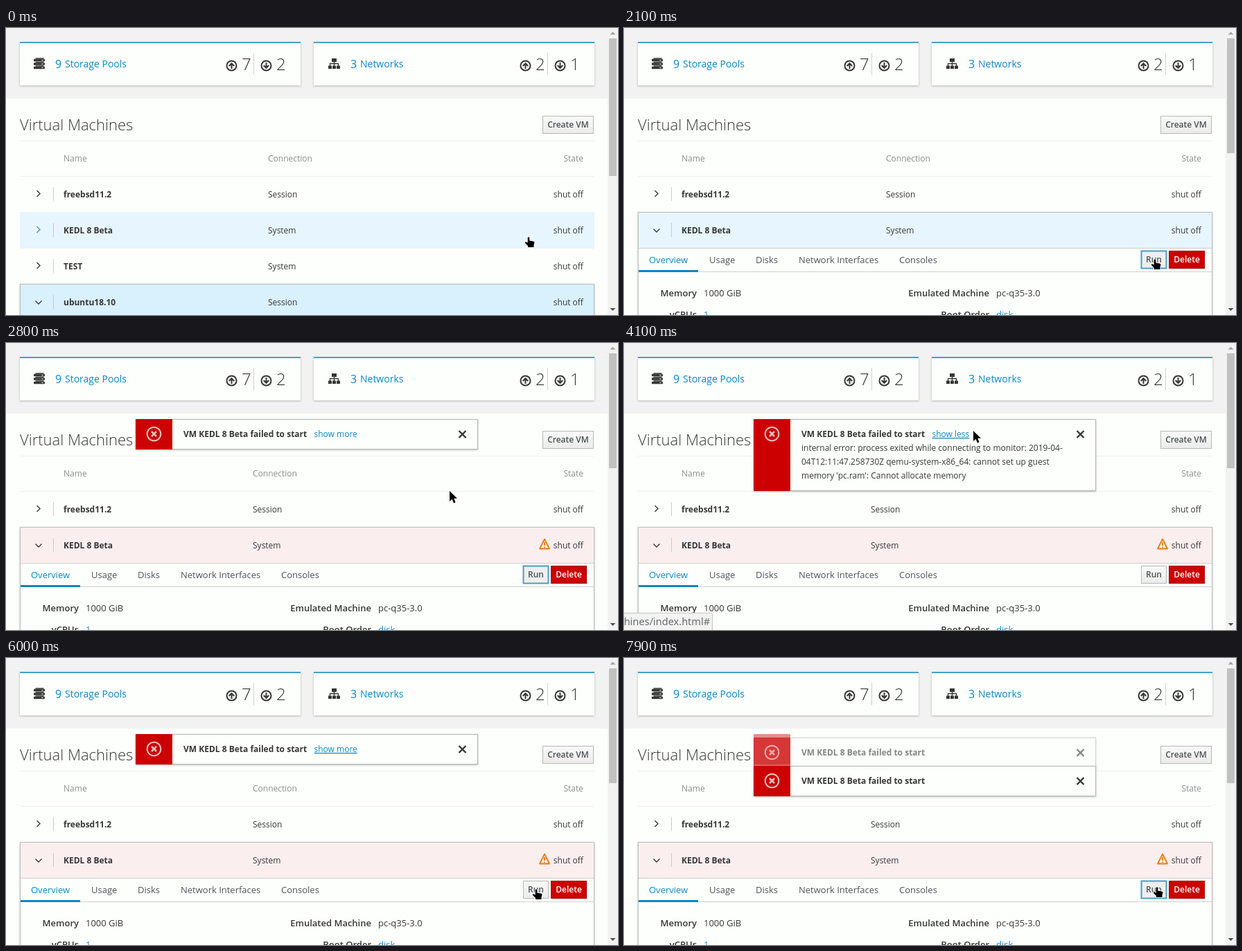
An HTML page for the animation above (8 s loop, 883 by 415 pixels).

```html
<!DOCTYPE html>
<html lang="en">
<head>
<meta charset="utf-8">
<title>Virtual Machines</title>
<style>
  html, body { margin: 0; width: 100%; height: 100%; overflow: hidden; background: #fdfffc; }
  svg { display: block; font-family: "Open Sans", sans-serif; font-size: 12px; fill: #363636; }
</style>
</head>
<body>
<svg id="stage" width="883" height="415" viewBox="0 0 883 415"></svg>
<script>
const LOOP = 8000, STEP = 100;
const VM = 'KEDL 8 Beta';
const WHITE = '#fdfffc', INK = '#363636', BLUE = '#0b86c4', RED = '#cc0000', MUTED = '#8b8d8f';
const ERROR_LINES = [
  'internal error: process exited while connecting to monitor: 2019-04-',
  '04T12:11:47.258730Z qemu-system-x86_64: cannot set up guest',
  "memory 'pc.ram': Cannot allocate memory"
];

// Times of the interactions
const EXPAND = 1000, RUN = 2100, FAIL = 2500, SHOW_MORE = 3900, SHOW_LESS = 5300,
      BLUR = 6200, RERUN = 6400, FAIL_AGAIN = 6600, DISMISS = 7500;

// Pointer tip: time, x, y
const PATH = [
  [1300, 754, 302], [1800, 766, 334], [2300, 766, 334], [2800, 640, 214], [2900, 638, 212],
  [3700, 496, 129], [3900, 496, 129], [4100, 504, 127], [4700, 492, 150], [5000, 495, 129],
  [5400, 495, 129], [6000, 765, 334], [6400, 765, 334], [6600, 769, 331]
];

const between = (t, a, b) => t >= a && t < b;
const progress = (t, a, b) => Math.min(1, Math.max(0, (t - a) / (b - a)));
const easeOut = p => 1 - (1 - p) ** 2;
const smooth = p => p * p * (3 - 2 * p);

const rect = (x, y, w, h, fill, extra = '') =>
  `<rect x="${x}" y="${y}" width="${w}" height="${h}" fill="${fill}" ${extra}/>`;
const text = (x, y, s, extra = '') => `<text x="${x}" y="${y}" ${extra}>${s}</text>`;
const path = (d, stroke, width = 1, extra = '') =>
  `<path d="${d}" fill="none" stroke="${stroke}" stroke-width="${width}" ${extra}/>`;
const group = (x, y, body, extra = '') => `<g transform="translate(${x} ${y})" ${extra}>${body}</g>`;
const BOLD = 'font-weight="700"', SEMI = 'font-weight="600"', END = 'text-anchor="end"',
      MIDDLE = 'text-anchor="middle"';

const defs = `<defs>
  <linearGradient id="button" x2="0" y2="1"><stop stop-color="#f8f9f8"/><stop offset="1" stop-color="#ebecea"/></linearGradient>
  <filter id="shadow" x="-5%" y="-15%" width="110%" height="140%">
    <feDropShadow dx="0" dy="1" stdDeviation="1.5" flood-color="#000" flood-opacity=".25"/></filter>
</defs>`;

function circleArrow(x, y, direction) {
  return group(x, y, `<g transform="scale(1 ${direction})">
    <circle r="7" fill="none" stroke="${INK}" stroke-width="2"/>
    ${path('M0 4.5V-3M-3.8 .5L0 -3.3L3.8 .5', INK, 2)}</g>`);
}

function card(x, icon, count, label, labelX, up, down) {
  const number = (nx, n) => text(nx, 61, n, 'font-size="24" font-weight="300"');
  return group(x, 0,
    rect(0, 20, 405, 63, WHITE, 'filter="url(#shadow)"') +
    rect(0, 20, 405, 2, '#44a3cb') + icon +
    text(labelX, 58, count, `font-size="16" fill="${BLUE}"`) +
    text(labelX + 14, 57, label, `font-size="14" fill="${BLUE}"`) +
    circleArrow(305.5, 54.5, 1) + number(320, up) +
    path('M337.5 36V68', '#d1d1d1') +
    circleArrow(355.5, 54.5, -1) + number(370, down));
}

const storageIcon = [44, 49.5, 55].map(y =>
  path(`M22.5 ${y}H34.5`, INK, 1.5) + rect(20, y + .7, 16, 3.6, INK, 'rx=".7"') +
  rect(31.5, y + 2, 2, 1, WHITE)).join('');

const networkIcon = rect(26, 44, 7, 5, INK) +
  [21, 27, 33].map(x => rect(x, 54.5, 5, 4.5, INK)).join('') +
  path('M29.5 48V55M23.5 55V51.5H35.5V55', INK, 1.3);

function button(x, y, w, h, label, style = {}) {
  const { fill = 'url(#button)', stroke = '#b7b8b7', color = '#4d5258', width = 1 } = style;
  return rect(x + .5, y + .5, w - 1, h - 1, fill, `stroke="${stroke}" stroke-width="${width}"`) +
    text(x + w / 2, y + h / 2 + 4, label, `${SEMI} ${MIDDLE} fill="${color}"`);
}

function row(y, name, connection, connectionX, open, chevronColor = INK) {
  const chevron = open ? 'M42.5 -1.5L47 3L51.5 -1.5' : 'M44.5 -5L49 -.5L44.5 4';
  return group(0, y, path(chevron, chevronColor, 1.4) + path('M68.5 -10V10', '#c9cbca') +
    text(83, 5, name, BOLD) + text(connectionX, 5, connection) + text(833, 5, 'shut off', END));
}

function page(t) {
  const failed = t >= FAIL;
  const columnX = failed ? 356 : 378;
  return rect(0, 0, 883, 415, WHITE) + rect(0, 0, 868, 102, '#f1f2f1') +
    card(20, storageIcon, 9, 'Storage Pools', 51, 7, 2) +
    card(444, networkIcon, 3, 'Networks', 53, 2, 1) +
    text(20, 148, 'Virtual Machines', 'font-size="22" font-weight="300"') +
    button(774, 127, 74, 26, 'Create VM') +
    path('M20 163.5H848M20 214.5H848', '#eff0ee') +
    `<g fill="${MUTED}">` + text(83, 193, 'Name') + text(columnX, 193, 'Connection') +
    text(833, 193, 'State', END) + '</g>' +
    row(240, 'freebsd11.2', 'Session', columnX, false) +
    (t < EXPAND ? collapsedRows() : expandedRow(t, failed, columnX));
}

function collapsedRows() {
  return rect(20, 266, 829, 53, '#e7f5fe') + path('M20 318.5H848', '#eff0ee') +
    row(292, VM, 'System', 378, false, '#3a9fc4') +
    row(344, 'TEST', 'System', 378, false) +
    rect(20.5, 370.5, 828, 60, '#d9f0fd', 'stroke="#b9bdbf" filter="url(#shadow)"') +
    row(396, 'ubuntu18.10', 'Session', 378, true);
}

function expandedRow(t, failed, columnX) {
  const focused = between(t, RUN, SHOW_MORE) || t >= RERUN;
  const tabs = [[36, 'Overview'], [123, 'Usage'], [190, 'Disks'], [252, 'Network Interfaces'], [397, 'Consoles']];
  const detail = (x, y, label, value, color = INK) =>
    text(x, y, label, `${SEMI} ${END}`) + text(x + 10, y, value, `fill="${color}"`);
  return rect(20.5, 266.5, 828, 170, WHITE, 'stroke="#bdbfbe" filter="url(#shadow)"') +
    rect(21, 267, 827, 51, failed ? '#fbeeee' : '#e7f5fe') +
    path('M21 318.5H848', '#cfd1d0') +
    row(292, VM, 'System', columnX, true) +
    (failed ? path('M777 283.5L784 297.5H770Z', '#ec7a08', 1.8, 'stroke-linejoin="round"') +
      path('M777 288V293M777 294.5V296', '#ec7a08', 1.8) : '') +
    path('M21 352.5H848', '#cfd1d0') + rect(21, 350, 86, 3, BLUE) +
    '<g font-size="13">' +
    tabs.map(([x, label], i) => text(x, 340, label, `fill="${i ? '#4d5258' : BLUE}"`)).join('') +
    detail(105, 388, 'Memory', '1000 GiB') + detail(527, 388, 'Emulated Machine', 'pc-q35-3.0') +
    detail(105, 419, 'vCPUs', '1', BLUE) + detail(527, 419, 'Boot Order', 'disk', BLUE) + '</g>' +
    button(746, 322, 37, 26, 'Run', focused ? { stroke: '#4f9cc6', width: 2, fill: '#eeefee' } : {}) +
    button(786, 322, 52, 26, 'Delete', { fill: RED, stroke: '#a30000', color: '#fff' });
}

function toast(y, { opacity = 1, expanded = false, link = 1, underline = false } = {}) {
  const height = expanded ? 104 : 44;
  const decoration = underline ? 'text-decoration="underline"' : '';
  return group(187, y,
    rect(.5, .5, 493, height - 1, WHITE, 'stroke="#b5b7b6" filter="url(#shadow)"') +
    rect(0, 0, 53, height, RED) +
    '<circle cx="26.5" cy="21.5" r="9.8" fill="none" stroke="#eec0c0" stroke-width="2"/>' +
    path('M23 18L30 25M30 18L23 25', '#eec0c0', 2.6) +
    text(69, 26, `VM ${VM} failed to start`, BOLD) +
    text(257.5, 26, expanded ? 'show less' : 'show more', `fill="${BLUE}" opacity="${link}" ${decoration}`) +
    (expanded ? ERROR_LINES.map((s, i) => text(69, 46 + 20 * i, s)).join('') : '') +
    path('M466.5 17L476.5 27M476.5 17L466.5 27', INK, 2.4), `opacity="${opacity}"`);
}

function toasts(t) {
  if (t < FAIL) return '';
  const enter = easeOut(progress(t, FAIL - STEP, FAIL + 200));
  const leave = progress(t, DISMISS, 7900);
  const second = 110 + 49 * easeOut(progress(t, FAIL_AGAIN - STEP, 6950)) - 3 * leave;
  const first = toast(110 + 12 * (1 - enter) + 5 * leave, {
    opacity: enter * (1 - .4 * leave),
    expanded: between(t, SHOW_MORE, SHOW_LESS),
    link: 1 - .96 * progress(t, FAIL_AGAIN, 6900) - .04 * progress(t, 6900, 7000),
    underline: between(t, 3700, BLUR)
  });
  const next = t >= FAIL_AGAIN ? toast(second, { link: 0 }) : '';
  const afterglow = leave ? rect(187, 110, 494, 44, WHITE) + rect(187, 110, 53, 44, RED, 'opacity=".45"') : '';
  return leave ? afterglow + first + next : next + first;
}

function scrollbar(t) {
  return rect(868, 0, 15, 415, '#f1f2f1') +
    rect(870, 15, 11, t < EXPAND ? 199 : 166, '#c1c1c1') +
    '<path d="M871.5 9.5L875.5 5.5L879.5 9.5Z" fill="#a3a3a3"/>' +
    '<path d="M871.5 405L875.5 409L879.5 405Z" fill="#505050"/>';
}

function statusBar(t) {
  if (!between(t, 3700, 4200) && !between(t, 5000, 5500)) return '';
  return rect(-3.5, 390.5, 131, 30, '#f2f3f2', 'stroke="#c4c5c4" rx="2"') +
    text(124, 408, 'hines/index.html#',
      `${END} font-size="14.5" fill="#6a6c6b" style="font-family:'Noto Sans',sans-serif"`);
}

function pointer(t) {
  let i = PATH.findIndex(key => key[0] > t);
  if (i < 0) i = PATH.length;
  const from = PATH[Math.max(0, i - 1)], to = PATH[Math.min(i, PATH.length - 1)];
  const p = from === to ? 0 : smooth(progress(t, from[0], to[0]));
  const [x, y] = [1, 2].map(k => Math.round(from[k] + (to[k] - from[k]) * p));
  const isArrow = between(t, 2400, 3700) || between(t, 4100, 5000) || between(t, 5500, 6000);
  const arrow = 'M0 0V15L3.5 11.8L6 17.5L8.6 16.3L6.2 10.8H11Z';
  const hand = 'M-1.3 1Q0 -.5 1.3 1V5.5L7 6.5Q8.5 7 8.5 8.5L7.5 12V15H-1V13L-5 9Q-5.5 7 -3.5 7.2L-1.3 8.5Z';
  return group(x, y, `<path d="${isArrow ? arrow : hand}" fill="#000" stroke="#fff" stroke-width="1.6"
    stroke-linejoin="round" paint-order="stroke"/>`);
}

const stage = document.getElementById('stage');
const start = performance.now();
let shown = -1;

function render() {
  const t = Math.floor(((performance.now() - start) % LOOP) / STEP) * STEP;
  if (t !== shown) {
    shown = t;
    stage.innerHTML = defs + page(t) + toasts(t) + scrollbar(t) + statusBar(t) + pointer(t);
  }
  requestAnimationFrame(render);
}
render();
</script>
</body>
</html>
```
